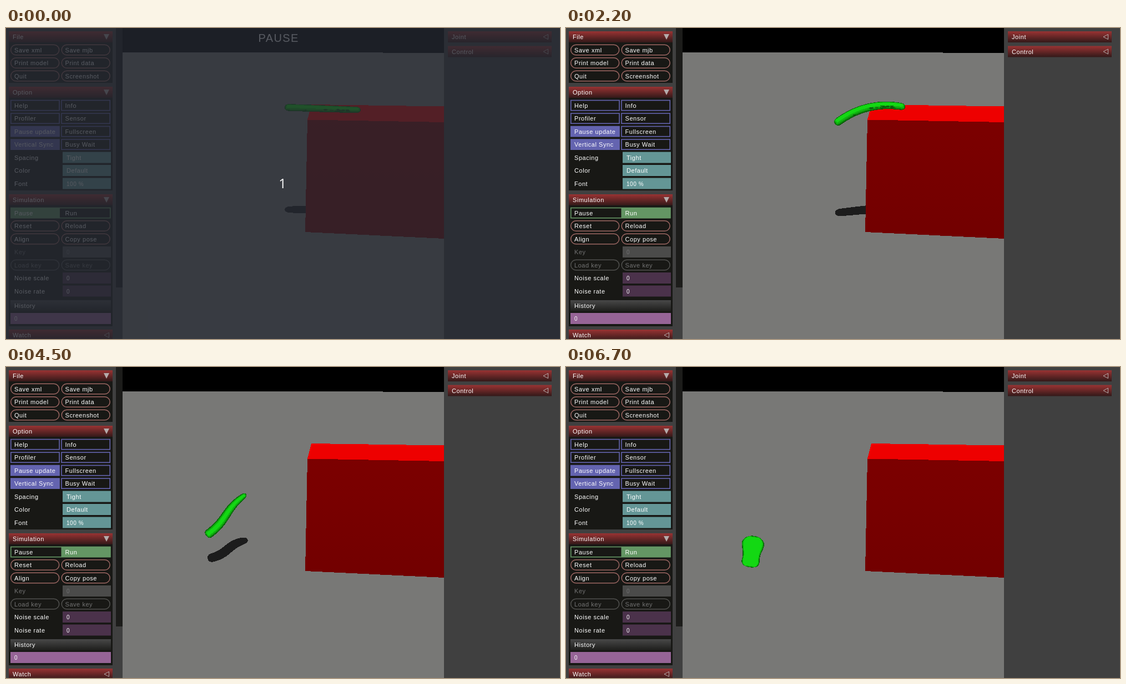
Recreate the animation shown at these times as an HTML page. Size 998 by 561 pixels, loop 6.8 s.

```html
<!DOCTYPE html>
<html lang="en">
<head>
<meta charset="utf-8">
<title>Soft body simulation</title>
<style>
html, body { margin: 0; width: 100%; height: 100%; overflow: hidden; background: #404040; }
svg { display: block; width: 998px; height: 561px; }
text { font: 11px "Liberation Sans", Arial, sans-serif; letter-spacing: .55px; fill: #fff; white-space: pre; }
text.value { font-size: 10px; }
text.dim { fill: #737373; }
#pauseTitle { font-size: 20px; letter-spacing: 1.4px; }
#count { font: 24px "Open Sans", sans-serif; letter-spacing: 0; }
#scene { shape-rendering: crispEdges; }
</style>
</head>
<body>
<svg id="stage" viewBox="0 0 998 561">
  <defs>
    <linearGradient id="redHead" x2="0" y2="1">
      <stop stop-color="#993333"/><stop offset="1" stop-color="#331919"/>
    </linearGradient>
    <linearGradient id="greyHead" x2="0" y2="1">
      <stop stop-color="#484848"/><stop offset="1" stop-color="#1e1e1c"/>
    </linearGradient>
    <linearGradient id="front" x2="0" y2="1">
      <stop stop-color="#7c0000"/><stop offset="1" stop-color="#720000"/>
    </linearGradient>
  </defs>
  <rect width="998" height="561" fill="#404040"/>
  <g id="scene">
    <rect x="210" width="579" height="561" fill="#787876"/>
    <path d="M210 0H789V44.600L210 44.100Z" fill="#000"/>
    <path id="shadow" fill="#1c1c1c"/>
    <path d="M543 165L789 169.500V380L539 368Z" fill="url(#front)"/>
    <path d="M550 138L789 141.500V170L543 165.500Z" fill="#ee0000"/>
    <g id="body"></g>
    <g id="spots" fill="#074a07"></g>
  </g>
  <text id="pauseTitle" x="454.500" y="25">PAUSE</text>
  <g id="panel"></g>
  <g id="veil">
    <rect width="998" height="561" fill="rgb(37,41,50)" fill-opacity=".77"/>
    <text id="count" x="498" y="289" text-anchor="middle">1</text>
  </g>
</svg>
<script>
const LOOP = 6800, STEP = 100, ROW = 23.5;
const $ = id => document.getElementById(id);

function add(parent, tag, attrs, content) {
  const el = document.createElementNS("http://www.w3.org/2000/svg", tag);
  for (const k in attrs) el.setAttribute(k, attrs[k]);
  if (content) el.textContent = content;
  parent.appendChild(el);
  return el;
}

// ---- side panels ----
const panel = $("panel");
const box = (x, y, width, height, fill, more) => add(panel, "rect", { x, y, width, height, fill, ...more });
const label = (s, x, cy, cls = "") => add(panel, "text", { x, y: cy + 4, class: cls }, s);

function header(s, x, y, open) {
  box(x, y, 187, 20, "url(#redHead)");
  label(s, x + 7, y + 10);
  const r = x + 181;
  add(panel, "path", open
    ? { d: `M${r - 10} ${y + 5}H${r}L${r - 5} ${y + 15}Z`, fill: "#b4abab" }
    : { d: `M${r - 9} ${y + 10}L${r - .5} ${y + 5.5}V${y + 14.5}Z`, fill: "none", stroke: "#b4abab" });
}

function section(s, y, bottom, rows) {
  box(5, y, 187, bottom - y, "#181815");
  header(s, 5, y, true);
  rows.forEach((row, i) => row(y + 33.5 + ROW * i));
}

const buttons = (names, dim) => cy => names.forEach((s, i) => {
  box(8.7 + 91.5 * i, cy - 9.3, 87, 18.6, "none",
    { rx: 9.3, stroke: dim ? "#50504e" : "#9b6662", "stroke-width": 1.5 });
  label(s, 15 + 91.5 * i, cy, dim && "dim");
});

const checks = (names, on) => cy => names.forEach((s, i) => {
  box(8.8 + 91.2 * i, cy - 9, 87.3, 18.2, on && !i ? "#6464b0" : "none",
    { stroke: "#6464b0", "stroke-width": 1.6 });
  label(s, 15 + 91.5 * i, cy);
});

const field = (name, value, fill, cls = "") => cy => {
  label(name, 15, cy, cls);
  box(102, cy - 10, 87, 20, fill);
  label(value, 109, cy, /^\d/.test(value) ? "value " + cls : cls);
};

let runSwitch;
const switcher = cy => {
  runSwitch = box(8, cy - 9.5, 89, 19, "#649664");
  box(8.8, cy - 9, 179, 18.2, "none", { stroke: "#649664", "stroke-width": 1.6 });
  label("Pause", 15, cy);
  label("Run", 106.5, cy);
};

box(198, 0, 12, 468, "#1c1c1a");
section("File", 6, 99, [
  buttons(["Save xml", "Save mjb"]),
  buttons(["Print model", "Print data"]),
  buttons(["Quit", "Screenshot"])]);
section("Option", 106, 293, [
  checks(["Help", "Info"]),
  checks(["Profiler", "Sensor"]),
  checks(["Pause update", "Fullscreen"], true),
  checks(["Vertical Sync", "Busy Wait"], true),
  field("Spacing", "Tight", "#649696"),
  field("Color", "Default", "#649696"),
  field("Font", "100 %", "#649696")]);
section("Simulation", 300, 538, [
  switcher,
  buttons(["Reset", "Reload"]),
  buttons(["Align", "Copy pose"]),
  field("Key", "0", "#4b4b4a", "dim"),
  buttons(["Load key", "Save key"], true),
  field("Noise scale", "0", "#4b324b"),
  field("Noise rate", "0", "#4b324b")]);
box(8, 491, 181, 20, "url(#greyHead)");
label("History", 15, 501);
box(8, 514, 181, 20, "#966496");
label("0", 15, 524, "value");
header("Watch", 5, 544);
header("Joint", 796, 6);
header("Control", 796, 32.5);

// ---- soft body: slides over the edge, falls, lands and rolls end-on ----
const KEYS = [
  { t: 200, x: 570.5, y: 145.5, angle: 2, length: 137 },
  { t: 900, x: 566, y: 150.5, angle: -3, length: 136 },
  { t: 2200, x: 548, y: 158, angle: -13.5, length: 130 },
  { t: 3000, x: 524, y: 168.5, angle: -28, length: 129 },
  { t: 3900, x: 453.5, y: 211.5, angle: -43, length: 116 },
  { t: 5100, x: 347, y: 319, angle: -48.5, length: 90 },
  { t: 5800, x: 339.5, y: 329, angle: -56.5, length: 67 },
  { t: 6700, x: 335, y: 333, angle: -82, length: 57 }];

// Smooth curve through one property of the keys.
function track(name, t) {
  const n = KEYS.length - 1;
  let i = 0;
  while (i < n - 1 && t > KEYS[i + 1].t) i++;
  const slope = k => {
    const a = KEYS[Math.max(k - 1, 0)], b = KEYS[Math.min(k + 1, n)];
    return (b[name] - a[name]) / (b.t - a.t);
  };
  const a = KEYS[i], b = KEYS[i + 1], h = b.t - a.t, s = (t - a.t) / h, r = 1 - s;
  return a[name] * r * r * (1 + 2 * s) + b[name] * s * s * (3 - 2 * s)
    + h * s * r * (slope(i) * r - slope(i + 1) * s);
}

const ramp = (t, a, b) => Math.min(1, Math.max(0, (t - a) / (b - a)));
const join = pts => pts.map(p => p.map(v => v.toFixed(2)).join(" ")).join("L");

// A tube has a spine(u), a half width(u) and the share of its length that rounds each end.
function edge({ spine, width, cap }, u, side) {
  const [x, y] = spine(u), [x0, y0] = spine(u - .01), [x1, y1] = spine(u + .01);
  const dx = x1 - x0, dy = y1 - y0;
  const q = Math.max(0, 1 - Math.min(u, 1 - u) / cap);
  const w = width(u) * Math.pow(Math.max(0, 1 - q * q), .42) * side / Math.hypot(dx, dy);
  return [x + dy * w, y - dx * w];
}

function outline(tube, size = 1, lift = 0) {
  const e = (1 - size) * tube.cap, N = 60, pts = [];
  const u = i => e + (1 - 2 * e) * (1 - Math.cos(Math.PI * i / N)) / 2;
  for (let i = 0; i <= N; i++) pts.push(edge(tube, u(i), lift + size));
  for (let i = N; i >= 0; i--) pts.push(edge(tube, u(i), lift - size));
  return "M" + join(pts) + "Z";
}

function bodyTube(t, flat) {
  const x = track("x", t), y = track("y", t), length = track("length", t);
  const angle = track("angle", t) * Math.PI / 180;
  const bend = 15 * Math.sin(Math.PI * ramp(t, 200, 4400));
  const wave = 4 * ramp(t, 3000, 5100) * (1 - flat);
  const base = 6.3 + 2.2 * ramp(t, 200, 5100) + 9.5 * flat;
  const taper = .15 + .35 * ramp(t, 2200, 3900) * (1 - flat) - .15 * flat;
  const spine = u => {
    const along = (u - .5) * length;
    const side = wave * Math.sin(2 * Math.PI * u) - bend * 4 * u * (1 - u);
    return [x + along * Math.cos(angle) - side * Math.sin(angle),
            y + along * Math.sin(angle) + side * Math.cos(angle)];
  };
  const width = u => base * (1 - taper * u ** 3 + .13 * flat * Math.cos(7 * (u - .78)));
  return { spine, width, cap: .055 + .2 * flat, wave };
}

function shadowTube(t, flat, body) {
  const dx = 4 * ramp(t, 3000, 5100) - 5 * flat;
  const y = 327.5 + 6 * ramp(t, 3900, 6700), tilt = 55 * ramp(t, 900, 6700);
  return {
    spine: u => [body.spine(u)[0] + dx, y - tilt * (u - .5) + body.wave * .8 * Math.sin(2 * Math.PI * u)],
    width: u => body.width(u) * (.92 + .3 * u * (1 - flat)),
    cap: .09 + .16 * flat
  };
}

const layers = [[1, "#075607"], [.88, "#0a860a"], [.68, "#0fb40f"], [.42, "#13d813"]]
  .map(([size, fill]) => ({ size, el: add($("body"), "path", { fill }) }));

let seed = 7;
const random = () => (seed = seed * 16807 % 2147483647) / 2147483647;
const spots = Array.from({ length: 14 }, () => ({
  u: .28 + .6 * random(), side: -.15 - .5 * random(),
  el: add($("spots"), "ellipse", { rx: 2 + 3 * random(), ry: .7 + .8 * random() })
}));

function draw(t) {
  const paused = t < 300;
  $("veil").style.display = t < 100 ? "" : "none";
  $("pauseTitle").style.display = paused ? "" : "none";
  runSwitch.setAttribute("x", paused ? 8 : 99.5);

  const m = Math.max(t, 200), flat = ramp(m, 5100, 6700);
  const body = bodyTube(m, flat);
  $("shadow").setAttribute("d", outline(shadowTube(m, flat, body)));

  const tilt = .6 - .5 * ramp(m, 2200, 3900);
  for (const { size, el } of layers) {
    const s = size + (1 - size) * .72 * flat;
    el.setAttribute("d", outline(body, s, (1 - s) * tilt));
  }
  for (const { u, side, el } of spots) {
    const [x, y] = edge(body, u, side);
    el.setAttribute("cx", x);
    el.setAttribute("cy", y);
  }
  $("spots").setAttribute("opacity", .75 * (1 - ramp(m, 2300, 3400)));
}

function tick() {
  draw(Math.floor(performance.now() % LOOP / STEP) * STEP);
  requestAnimationFrame(tick);
}
tick();
</script>
</body>
</html>
```
